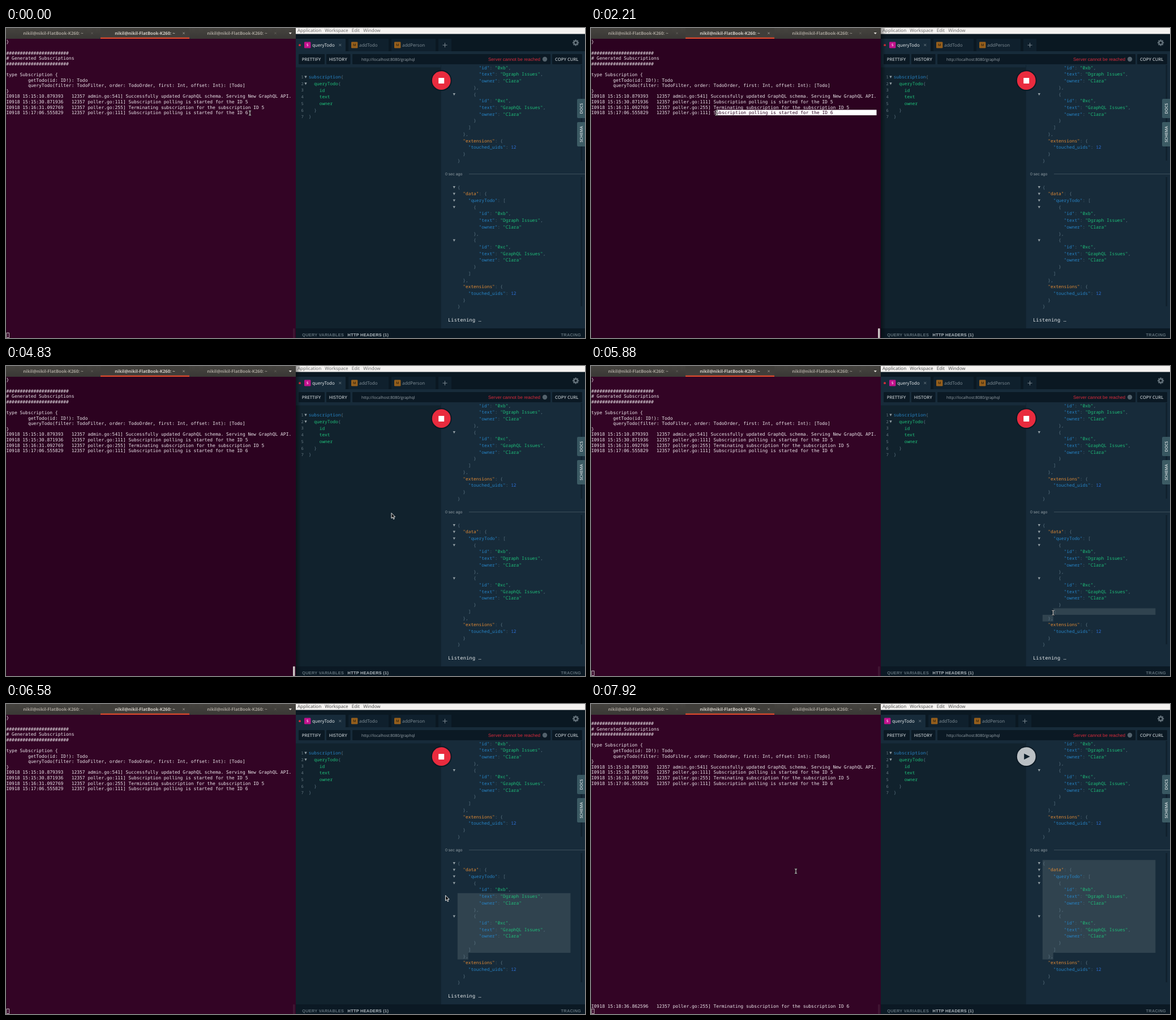
Animation of 1023x547 px, one loop 8 s. Source, as an HTML page:

```html
<!DOCTYPE html>
<html lang="en">
<head>
<meta charset="utf-8">
<title>GraphQL subscription</title>
<style>
html, body { margin: 0; width: 100%; height: 100%; overflow: hidden; background: #11222d; }
svg { display: block; width: 100vw; height: 100vh; }
text { white-space: pre; text-rendering: geometricPrecision; }
.term { font: 7.97px "DejaVu Sans Mono", monospace; fill: #ebe6ea; }
.code { font: 7.87px "Noto Sans Mono", monospace; fill: #5a7280; }
.title { font: bold 7.7px "Noto Sans", sans-serif; text-anchor: middle; }
.menu { font: 8px "Noto Sans", sans-serif; }
.tab { font: 7.95px "Open Sans", sans-serif; }
.icon { font: 600 6px "Open Sans", sans-serif; text-anchor: middle; }
.btn { font: 600 7.65px "Open Sans", sans-serif; fill: #b9c1c6; }
.sans { font-family: "Liberation Sans", sans-serif; }
.foot { font: bold 7.3px "Liberation Sans", sans-serif; letter-spacing: .31px; }
.side { font: 600 7px "Open Sans", sans-serif; fill: #d9e0e2; text-anchor: middle; }
</style>
</head>
<body>
<svg id="stage" viewBox="0 0 1023 547" preserveAspectRatio="none">
  <defs>
    <linearGradient id="bar" x2="0" y2="1">
      <stop stop-color="#45433f"/><stop offset="1" stop-color="#3a3835"/>
    </linearGradient>
    <linearGradient id="shade">
      <stop stop-color="#000" stop-opacity=".4"/><stop offset="1" stop-color="#000" stop-opacity="0"/>
    </linearGradient>
    <clipPath id="results"><rect x="768" y="65" width="255" height="465"/></clipPath>
  </defs>
  <g id="browser"></g>
  <g id="terminal"></g>
  <g id="pointers">
    <g id="beam" fill="none" stroke-linecap="round">
      <path d="M-1.6-4Q0-4 0-3Q0-4 1.6-4M0-3V3M-1.6 4Q0 4 0 3Q0 4 1.6 4" stroke="#111" stroke-width="2"/>
      <path d="M-1.6-4Q0-4 0-3Q0-4 1.6-4M0-3V3M-1.6 4Q0 4 0 3Q0 4 1.6 4" stroke="#fff" stroke-width=".9"/>
    </g>
    <path id="arrow" d="M0 0V9.4L2.2 7.4L3.7 10.9L5.3 10.2L3.8 6.8H6.6Z" fill="#111" stroke="#fff" stroke-width=".9"/>
    <path id="hand" d="M-1 0Q0-1 1 0V4L5 5Q6 5 6 7L5 11H-1L-4 7Q-4 5-1 7Z" fill="#fff" stroke="#111" stroke-width=".8"/>
  </g>
</svg>
<script>
const LOOP = 8000, FOCUS = 460, CLEAR = 4210, BLUR = 5800, STOP = 7200;
const COL = 4.8, ROW = 9.6;                        // terminal cell
const CODE_X = 797.8, CODE_COL = 4.722, CODE_ROW = 11.71, RESULT_Y = 281;
const RUN_X = 769.2, RUN_Y = 92.7;
const $ = id => document.getElementById(id);

const rect = (x, y, w, h, fill, more = "") =>
  `<rect x="${x}" y="${y}" width="${w}" height="${h}" fill="${fill}" ${more}/>`;
const circle = (x, y, r, more) => `<circle cx="${x}" cy="${y}" r="${r}" ${more}/>`;
const text = (x, y, cls, str, more = "") =>
  `<text x="${x}" y="${y}" class="${cls}" ${more}>${str}</text>`;
const span = (fill, str) => `<tspan fill="${fill}">${str}</tspan>`;
const fold = (x, y) =>
  `<path d="M${x - 2.2} ${y - 2}h4.4l-2.2 4.2z" fill="#929ea4"/>`;
const cross = (x, y, r, color) =>
  `<path d="M${x - r} ${y - r}l${2 * r} ${2 * r}m0 ${-2 * r}l${-2 * r} ${2 * r}" stroke="${color}" stroke-width=".9"/>`;

// ---- terminal ----
const HASHES = "#".repeat(23);
const lines = [
  "}", "", HASHES, "# Generated Subscriptions", HASHES, "",
  "type Subscription {",
  "        getTodo(id: ID!): Todo",
  "        queryTodo(filter: TodoFilter, order: TodoOrder, first: Int, offset: Int): [Todo]",
  "}",
  "I0918 15:15:10.879393   12357 admin.go:541] Successfully updated GraphQL schema. Serving New GraphQL API.",
  "I0918 15:15:30.871936   12357 poller.go:111] Subscription polling is started for the ID 5",
  "I0918 15:16:31.092769   12357 poller.go:255] Terminating subscription for the subscription ID 5",
  "I0918 15:17:06.555829   12357 poller.go:111] Subscription polling is started for the ID 6"
];
const lastLine = "I0918 15:18:36.862596   12357 poller.go:255] Terminating subscription for the subscription ID 6";
const termX = col => .5 + col * COL;
const baseline = row => 27.4 + row * ROW;

function drawTerminal() {
  const tabs = [[83.5, 152, "#a39e96"], [245.5, 314, "#cfcac2"], [408.5, 476, "#a39e96"]];
  const title = ([x, close, color], i) =>
    text(x, 11.7, "title", "nikil@nikil-FlatBook-K260: ~", `fill="${color}"`) +
    cross(close, 9.2, 1.7, i === 1 ? "#99948d" : "#625f5a");
  $("terminal").innerHTML =
    rect(0, 0, 512, 547, "#330425", 'id="termBg"') +
    rect(0, 0, 512, 19, "url(#bar)") +
    rect(167, 0, 157, 19, "#403e3a") + rect(167, 16.7, 157, 2.3, "#d9492c") +
    tabs.map(title).join("") +
    '<path d="M499.7 8h5.2l-2.6 3z" fill="#e4e0da"/>' +
    rect(0, 19, .7, 528, "#1b1418") +
    rect(507, 530, 3.6, 17, "#3f1532", 'id="scroll" rx="1"') +
    `<g id="log">${lines.map((s, i) => text(.5, baseline(i), "term", s)).join("")}</g>` +
    text(.5, baseline(53), "term", lastLine, 'id="lastLine"') +
    rect(0, 144.4, 0, 9.6, "#fff", 'id="selBox"') +
    text(0, baseline(13), "term", "", 'id="selText" style="fill:#2c0220"') +
    rect(1.2, 538, 4.3, 8.6, "none", 'id="caret" stroke="#ebe6ea" stroke-width=".8"') +
    rect(512, 0, 9, 547, "url(#shade)", 'id="shadow"');
}

// ---- browser ----
const BLUE = "#2784c6", GREEN = "#1fc07a", ORANGE = "#e08a35";
const result = [
  "{", '  "data": {', '    "queryTodo": [', "      {",
  '        "id": "0xb",', '        "text": "Dgraph Issues",', '        "owner": "Clara"', "      },",
  "      {", '        "id": "0xc",', '        "text": "GraphQL Issues",', '        "owner": "Clara"', "      }",
  "    ]", "  },", '  "extensions": {', '    "touched_uids": 12', "  }", "}"
];
const paint = line => line.replace(/"[^"]*"(:?)|\d+$/g, (word, colon) => {
  if (!colon) return span(word[0] === '"' ? GREEN : "#2e70d8", word);
  return span(/data|extensions/.test(word) ? ORANGE : BLUE, word.slice(0, -1)) + ":";
});
const block = (y, from) => result.map((s, i) => i < from ? "" :
  text(CODE_X, y + i * CODE_ROW + 2.6, "code", paint(s)) +
  ([0, 1, 2, 3, 8].includes(i) ? fold(791.8, y + i * CODE_ROW) : "")).join("");

const query = [
  span(BLUE, "subscription") + "{", "  " + span(GREEN, "queryTodo") + "{",
  ...["id", "text", "owner"].map(s => "    " + span(GREEN, s)), "  }", "}"
];

function tab(x, w, letter, color, name, active) {
  return rect(x, 19, w, 22, active ? "#172b3a" : "#0f202d", 'rx="1"') +
    rect(x + (active ? 15 : 5), 24.6, 11.4, 11, color, 'rx="1.3"') +
    text(x + (active ? 20.7 : 10.7), 32.3, "icon", letter, `fill="${active ? "#fff" : "#35260f"}"`) +
    text(x + (active ? 29 : 19), 33, "tab", name, `fill="${active ? "#f0f3f4" : "#84919a"}"`);
}

function gear(x, y) {
  let teeth = "";
  for (let a = 0; a < 360; a += 45)
    teeth += rect(-1.2, -5.6, 2.4, 3, "#63717a", `transform="translate(${x} ${y}) rotate(${a})"`);
  return teeth + circle(x, y, 3.1, 'fill="none" stroke="#63717a" stroke-width="2.1"');
}

function sideTab(y, h, label, color) {
  return `<path d="M1023 ${y}h-12q-2 0-2 2v${h - 4}q0 2 2 2h12z" fill="${color}"/>` +
    text(0, 0, "side", label, `transform="translate(1018.7 ${y + h / 2}) rotate(-90)"`);
}

function drawBrowser() {
  const menu = [[515, "Application"], [563.3, "Workspace"], [610.7, "Edit"], [631.3, "Window"]];
  $("browser").innerHTML =
    rect(512, 0, 511, 547, "#11222d") + rect(512, 0, 511, 10.7, "#f4f2f0") +
    `<g id="menu">${menu.map(([x, s]) => text(x, 7.2, "menu", s)).join("")}</g>` +
    rect(512, 10.7, 511, 30.3, "#0a1822") +
    '<g id="tabs">' +
      tab(512, 88, "S", "#c2128d", "queryTodo", true) + cross(590.3, 30, 2, "#6f7d86") +
      tab(605, 71, "M", "#965f1c", "addTodo") + tab(681, 78, "M", "#965f1c", "addPerson") +
      rect(764, 19, 23, 22, "#0f202d") +
      '<path d="M771.5 30.2h8m-4-4v8" stroke="#7b8891" stroke-width="1"/>' +
    "</g>" +
    rect(505, 11, 7, 30, "#0a1822") +
    circle(519, 30.2, 1.9, 'id="dot" fill="#dd2c38"') + gear(1006.6, 26) +
    // toolbar
    rect(512, 41, 511, 28.5, "#172b3a") +
    rect(517, 46, 46, 18, "#0b1924", 'rx="1"') + text(522.8, 57.9, "btn", "PRETTIFY") +
    rect(566, 46, 42.5, 18, "#0b1924", 'rx="1"') + text(570.8, 57.9, "btn", "HISTORY") +
    rect(612, 46, 350, 18, "#0b1924", 'rx="1"') +
    text(628, 57.6, "tab", "http://localhost:8080/graphql", 'fill="#9aa5ac" style="font-size:6.95px"') +
    text(852, 58, "sans", "Server cannot be reached", 'font-size="8" fill="#d92b3c"') +
    circle(952, 55, 4.2, 'fill="#53626c"') +
    rect(965, 46, 53, 18, "#0b1924", 'rx="1"') +
    text(970, 57.9, "btn", "COPY CURL") +
    // query editor
    query.map((s, i) => {
      const y = 86.5 + i * CODE_ROW;
      return text(521.5, y + 2.5, "code", i + 1, 'style="font-size:7.2px;fill:#687982"') +
        text(534.8, y + 2.6, "code", s) + (i < 2 ? fold(529.5, y) : "");
    }).join("") +
    // results
    rect(768, 65, 255, 465, "#172b3a") + rect(768, 65, .8, 465, "#122430") +
    '<path id="resultSel" fill="#30434f"/>' +
    `<g clip-path="url(#results)">${block(23.3, 4)}${block(RESULT_Y, 0)}</g>` +
    text(776, 260.2, "sans", "0 sec ago", 'font-size="7" fill="#929da4"') +
    rect(818, 257.3, 205, .8, "#465966") +
    rect(1015.5, 65, 2.6, 169, "#10212d") + rect(1015.5, 263, 2.6, 228, "#10212d") +
    text(781, 517.8, "code", "Listening …", 'id="listening" style="font-size:8.4px;letter-spacing:.34px;fill:#eef1f2"') +
    // run button
    circle(RUN_X, RUN_Y, 18.4, 'fill="#0b1924"') + circle(RUN_X, RUN_Y, 16.4, 'id="run"') +
    rect(RUN_X - 5, RUN_Y - 4.8, 10, 10, "#fff", 'id="stopIcon" rx=".6"') +
    `<path id="playIcon" d="M${RUN_X - 4} ${RUN_Y - 5.3}l10.4 5.3l-10.4 5.3z" fill="#0d1f2b"/>` +
    sideTab(125, 34, "DOCS", "#385761") + sideTab(166, 43, "SCHEMA", "#3c5b64") +
    rect(512, 530, 511, 17, "#0b1924") +
    text(523.3, 543.8, "foot", "QUERY VARIABLES", 'fill="#61717a"') +
    text(603.6, 543.8, "foot", "HTTP HEADERS (1)", 'fill="#b1babf"') +
    text(980.6, 543.8, "foot", "TRACING", 'fill="#61717a"');
}

// ---- motion: time, x, y ----
const path = [
  [0, 431, 150], [460, 431, 150], [960, 335, 150], [1250, 298, 150], [1330, 298, 150],
  [2040, 224, 150], [2150, 224, 150], [2210, 221.5, 150], [2500, 221.5, 150], [2790, 218, 150],
  [3130, 218, 150], [3670, 302, 151], [4540, 302, 151], [4830, 680.5, 259], [5330, 918, 461],
  [5440, 918, 461], [5460, 918, 466], [5630, 918, 466], [5800, 826, 446], [6170, 782.5, 397.5],
  [6540, 777, 341], [6580, 776.5, 338], [6800, 784, 280], [6980, 784, 280], [7140, 770, 78],
  [7540, 770, 78], [7920, 362, 295], [8000, 362, 295]
];
function pointerAt(t) {
  const i = Math.max(1, path.findIndex(p => p[0] > t));
  const [t0, x0, y0] = path[i - 1], [t1, x1, y1] = path[i];
  const k = (t - t0) / (t1 - t0);
  return [x0 + (x1 - x0) * k, y0 + (y1 - y0) * k];
}

const show = (id, on) => $(id).setAttribute("visibility", on ? "visible" : "hidden");
const set = (id, attrs) => {
  for (const name in attrs) $(id).setAttribute(name, attrs[name]);
};

function selectLog(t) {
  const on = t >= FOCUS && t < CLEAR;
  show("selBox", on);
  show("selText", on);
  if (!on) return;
  const col = Math.round((pointerAt(Math.min(t, 2800))[0] - .5) / COL), x = termX(col);
  set("selBox", { x, width: termX(105) - x });
  set("selText", { x });
  $("selText").textContent = lines[13].slice(col);
}

function selectResult(t) {
  if (t < BLUR) return set("resultSel", { d: "" });
  const [x, y] = pointerAt(Math.min(t, 6900));
  const top = RESULT_Y - CODE_ROW / 2, endRow = 14, endX = CODE_X + 4 * CODE_COL;
  const row = Math.min(endRow, Math.max(0, Math.floor((y - top) / CODE_ROW)));
  const col = Math.min(result[row].length, Math.max(0, Math.round((x - CODE_X) / CODE_COL)));
  const x0 = CODE_X + col * CODE_COL, y0 = top + row * CODE_ROW, yEnd = top + endRow * CODE_ROW;
  const box = (l, a, r, b) => `M${l} ${a}H${r}V${b}H${l}Z`;
  const d = row === endRow ? box(x0, y0, endX, y0 + CODE_ROW) :
    box(x0, y0, 997.3, y0 + CODE_ROW) +
    box(CODE_X, y0 + CODE_ROW, 997.3, yEnd) +
    box(CODE_X, yEnd, endX, yEnd + CODE_ROW);
  set("resultSel", { d });
}

function render(t) {
  const focused = t >= FOCUS && t < BLUR, stopped = t >= STOP;
  set("termBg", { fill: focused ? "#2c0220" : "#330425" });
  set("scroll", { fill: focused ? "#c9c4c3" : "#3f1532" });
  set("caret", { fill: focused ? "#fff" : "none" });
  show("caret", !focused || Math.floor((t - 4040) / 612) % 2 === 0);
  show("shadow", focused);
  set("log", { transform: `translate(0 ${stopped ? -ROW : 0})` });
  $("log").firstChild.setAttribute("visibility", stopped ? "hidden" : "visible");
  show("lastLine", stopped);
  selectLog(t);

  set("menu", { fill: t < BLUR ? "#6b6b6b" : "#4c4c4c" });
  set("tabs", { transform: `translate(${stopped ? -9 : 0} 0)` });
  set("run", { fill: stopped ? "#bac0c4" : "#e92b3e" });
  show("dot", !stopped);
  show("listening", !stopped);
  show("stopIcon", !stopped);
  show("playIcon", stopped);
  selectResult(t);

  const [x, y] = pointerAt(t);
  const hand = Math.hypot(x - RUN_X, y - RUN_Y) < 17;
  const kind = hand ? "hand" : x < 512 || x > 793 ? "beam" : "arrow";
  for (const id of ["beam", "arrow", "hand"]) show(id, id === kind);
  set("pointers", { transform: `translate(${x} ${y})` });
}

drawBrowser();
drawTerminal();
const start = performance.now();
function tick() {
  render((performance.now() - start) % LOOP);
  requestAnimationFrame(tick);
}
tick();
</script>
</body>
</html>
```
